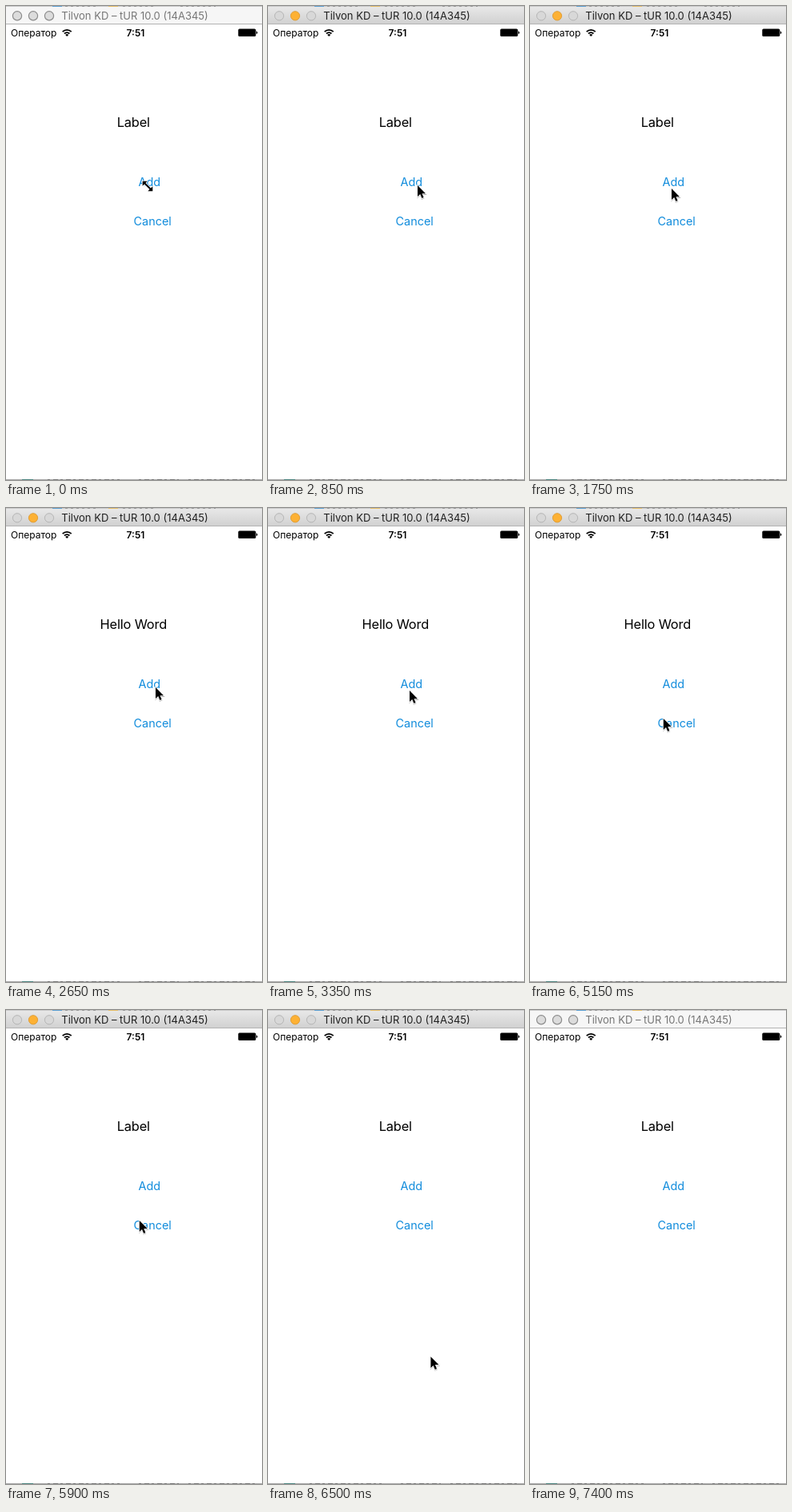
An HTML page for the animation above (7.45 s loop, 320 by 592 pixels).

```html
<!DOCTYPE html>
<html lang="en">
<head>
<meta charset="utf-8">
<title>Add and Cancel</title>
<style>
  html, body { margin: 0; width: 100%; height: 100%; overflow: hidden; background: #fff; }
  svg { display: block; width: 320px; height: 592px; font-family: Inter, "Open Sans", sans-serif; }
  .mid { text-anchor: middle; }
  .status { font-size: 12px; }
  .button { font-size: 14.4px; fill: #118cdc; }
  #label { font-size: 16.4px; letter-spacing: -.01em; }
  #title { font-size: 13px; fill: #767676; }
  #bar { fill: #f6f6f6; }
  .light { fill: #dcdcdc; stroke: #8c8c8c; stroke-width: 1.2; }
  .active #bar { fill: url(#chrome); }
  .active #title { fill: #202020; }
  .active .light { fill: #d8d8d8; stroke: #b5b5b5; stroke-width: 1; }
  .active #minimise { fill: #fdb134; stroke: #df9d35; }
</style>
</head>
<body>
<svg id="stage" viewBox="0 0 320 592">
  <defs>
    <linearGradient id="chrome" x2="0" y2="1">
      <stop stop-color="#e9e9e9"/>
      <stop offset="1" stop-color="#d1d1d1"/>
    </linearGradient>
    <filter id="shadow" x="-50%" y="-50%" width="200%" height="200%">
      <feDropShadow dx="0" dy="1" stdDeviation=".7" flood-opacity=".3"/>
    </filter>
  </defs>
  <rect width="320" height="592" fill="#fff"/>

  <!-- window chrome -->
  <rect id="bar" width="320" height="22"/>
  <path d="M0 .5H320" stroke="#c9c9c9"/>
  <path d="M58 .5h12" stroke="#5c9fd2"/>
  <path d="M128 .5h12" stroke="#e5bd67"/>
  <path d="M74 .5h40M146 .5h40M218 .5h44" stroke="#999" stroke-dasharray="3 4"/>
  <path d="M0 22.5H320" stroke="#b3b3b3"/>
  <circle class="light" cx="14" cy="12.3" r="5.6"/>
  <circle class="light" cx="34" cy="12.3" r="5.6" id="minimise"/>
  <circle class="light" cx="54" cy="12.3" r="5.6"/>
  <text id="title" class="mid" x="161" y="17">Tilvon KD – tUR 10.0 (14A345)</text>

  <!-- status bar -->
  <text class="status" x="6" y="37.5">Оператор</text>
  <g fill="none" stroke="#000" stroke-width="1.8">
    <path d="M70.7 32.2a7.6 7.6 0 0 1 11 0M73 34.5a4.6 4.6 0 0 1 6.4 0"/>
  </g>
  <path d="M74.2 35.9a2.8 2.8 0 0 1 4 0l-2 2.1z"/>
  <text class="status mid" x="162" y="37.5" font-weight="600">7:51</text>
  <rect x="290.3" y="28.5" width="22" height="9.5" rx="1.6"/>
  <path d="M312.8 31.3q1.5.3 1.5 1.9t-1.5 1.9z"/>

  <!-- app -->
  <text id="label" class="mid" x="159.3" y="151">Label</text>
  <text id="add" class="button mid" x="179.3" y="225">Add</text>
  <text id="cancel" class="button mid" x="183.2" y="274">Cancel</text>

  <path d="M0 591.5H320" stroke="#a8a8a8"/>
  <path d="M20 591.5h14" stroke="#4d8580"/>
  <path d="M52 591.5h90M166 591.5h50M228 591.5h86" stroke="#777" stroke-dasharray="3 4 6 3"/>

  <g id="resize" transform="translate(177 225)">
    <path d="M-4-4 4 4" stroke="#fff" stroke-width="3.4"/>
    <path d="M-6.3-6.3h6l-6 6zM6.3 6.3h-6l6-6z" stroke="#fff" paint-order="stroke"/>
    <path d="M-4-4 4 4" stroke="#000" stroke-width="1.9"/>
  </g>
  <path id="arrow" d="M0 0V14L3.2 11 5.4 16 7.6 15 5.5 10.2H10z"
        stroke="#fff" stroke-width="1.4" paint-order="stroke" filter="url(#shadow)"/>
</svg>
<script>
  const LOOP = 7450, STEP = 50, HOLD = 50, FADE = 100;
  const LINGER = 150, TRAVEL = 150;
  const LEAVE = 6200, GONE = 6800, EXIT = [240, 603];
  const el = id => document.getElementById(id);
  const [stage, label, add, cancel, resize, arrow] =
    ['stage', 'label', 'add', 'cancel', 'resize', 'arrow'].map(el);

  // Two bursts of alternating clicks, Add first, then a late Cancel.
  const burst = (count, from, gap) => Array.from({ length: count }, (_, i) => from + i * gap);
  const clicks = [...burst(8, 1100, 350), ...burst(3, 4150, 250), 5750];
  const isAdd = i => i % 2 === 0;

  const clamp = v => Math.min(1, Math.max(0, v));
  const ease = u => u * u * (3 - 2 * u);
  const mix = (a, b, k) => a.map((v, n) => v + (b[n] - v) * k);

  // The hand drifts a little from click to click.
  function spot(i) {
    const drift = Math.sin(2 * Math.PI * (clicks[i] - 2150) / 1400);
    const [x, y] = isAdd(i) ? [182, 226] : [169, 262];
    return [x + 5 * drift, y - 2 * drift];
  }

  const lastClick = t => clicks.findLastIndex(c => c <= t);

  function pointer(t) {
    const i = Math.max(0, lastClick(t)), last = clicks.length - 1;
    if (i === last) return mix(spot(i), EXIT, ease(clamp((t - LEAVE) / (GONE - LEAVE))));
    return mix(spot(i), spot(i + 1), ease(clamp((t - clicks[i] - LINGER) / TRAVEL)));
  }

  function draw(now) {
    const t = Math.floor(now % LOOP / STEP) * STEP;
    const pressed = lastClick(t), released = lastClick(t - HOLD);
    const glow = 0.2 + 0.8 * clamp((t - clicks[pressed] - HOLD) / FADE);
    const opacity = wantsAdd => pressed >= 0 && isAdd(pressed) === wantsAdd ? glow : 1;

    stage.classList.toggle('active', t >= 600 && t < 7400);
    label.textContent = released >= 0 && isAdd(released) ? 'Hello Word' : 'Label';
    add.style.opacity = opacity(true);
    cancel.style.opacity = opacity(false);
    resize.style.display = t < STEP ? '' : 'none';
    arrow.style.display = t >= STEP && t < GONE ? '' : 'none';
    const [x, y] = pointer(t);
    arrow.setAttribute('transform', `translate(${x.toFixed(1)} ${y.toFixed(1)})`);
  }

  const start = performance.now();
  function tick() {
    draw(performance.now() - start);
    requestAnimationFrame(tick);
  }
  tick();
</script>
</body>
</html>
```
